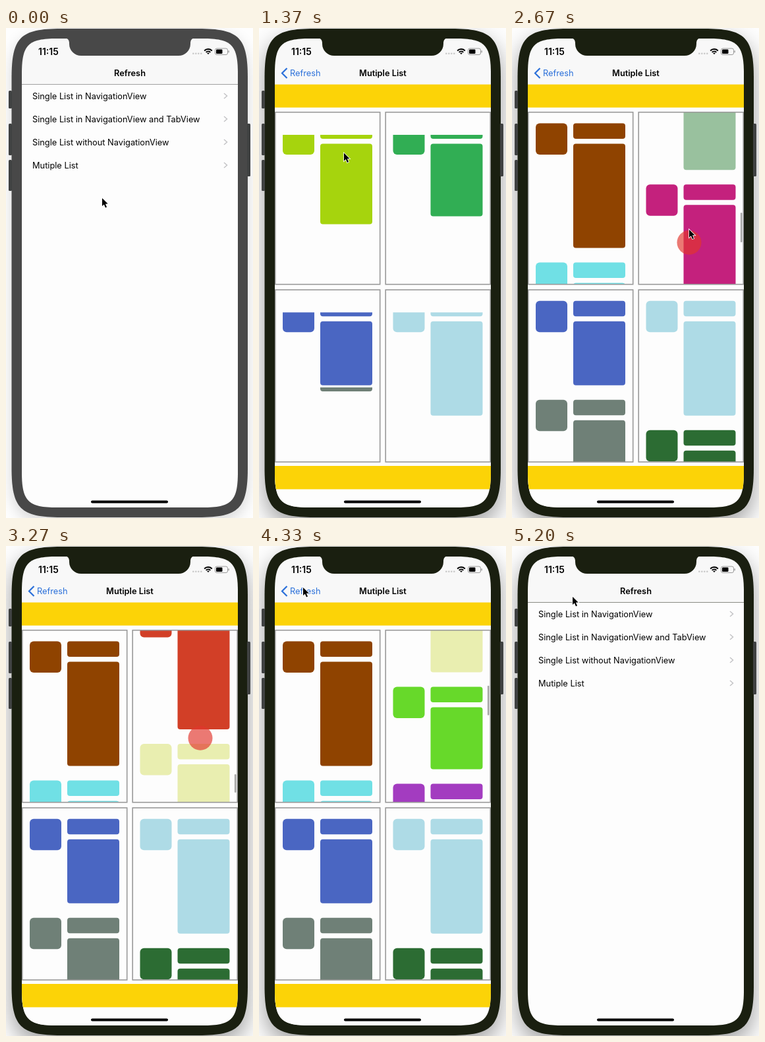
An HTML page with a canvas that plays this animation: 375x743 px, repeating every 5700 ms.

```html
<!DOCTYPE html>
<html lang="en">
<head>
<meta charset="utf-8">
<title>Refresh</title>
<style>
html, body { margin: 0; width: 100%; height: 100%; overflow: hidden; background: #fefefe; }
canvas { display: block; width: 375px; height: 743px; }
</style>
</head>
<body>
<canvas id="stage"></canvas>
<script>
const LOOP = 5700, W = 375, H = 743;
const canvas = document.getElementById('stage');
const c = canvas.getContext('2d');
const dpr = window.devicePixelRatio || 1;
canvas.width = W * dpr;
canvas.height = H * dpr;

const FAMILY = 'Inter, "Liberation Sans", sans-serif';
const FONT = `12.8px ${FAMILY}`, BOLD = `600 ${FONT}`, CLOCK = `600 14px ${FAMILY}`;
const MENU = ['Single List in NavigationView', 'Single List in NavigationView and TabView',
  'Single List without NavigationView', 'Mutiple List'];

// Rows are [colour, height of the large block].
const LIME = [['#a6d40d', 122], ['#1a1f10', 120]];
const BROWN = [['#8f4300', 158], ['#70e0e5', 120]];
const GREEN = [['#31ae54', 110], ['#4cf85f', 130], ['#d9a441', 120], ['#99c19e', 140],
  ['#c4217d', 150], ['#5687a8', 117], ['#d23f27', 156], ['#e9eeb0', 130],
  ['#67d92a', 94], ['#a33cc0', 120], ['#3f8f96', 130]];
const BLUE = [['#4a66c2', 97], ['#6f8077', 130]];
const SKY = [['#aedbe6', 143], ['#2c6c33', 130]];

const OPEN = 600, SETTLE = 1420, PULL = 1480, RELEASE = 1760, RELOAD = 2350, MORE = 3850, CLOSE = 4500;
const DRAG = 130, LAG = 30;

// Flings are [start, distance scrolled, finger x, finger y].
const FLINGS = [[2330, 560, 290, 335], [2620, 182, 269, 339], [2900, 353, 285, 330],
  [3220, 130, 295, 305], [4000, 184, 288, 330]];
const TOUCHES = [[450, 540], [PULL, RELEASE], ...FLINGS.map(([t]) => [t, t + DRAG]), [4410, 4480]];
const PATH = [[120, 146, 258], [400, 129, 209], [800, 129, 209], [1200, 129, 189], [PULL, 129, 190],
  [RELEASE, 125, 285], [2200, 292, 320],
  ...FLINGS.flatMap(([t, , x, y]) => [[t, x, y], [t + DRAG, x, y - 85]]),
  [4300, 67, 63], [CLOSE, 67, 63], [5150, 92, 77]];

const clamp = x => Math.max(0, Math.min(1, x));
const progress = (t, start, length) => clamp((t - start) / length);
const easeOut = x => 1 - (1 - x) ** 3;
const within = (t, a, b) => t >= a && t < b;

function cursorAt(t) {
  const i = PATH.findIndex(k => k[0] > t);
  const b = PATH.at(i), a = i > 0 ? PATH[i - 1] : b;
  const p = progress(t, a[0], b[0] - a[0] || 1);
  return [a[1] + (b[1] - a[1]) * p, a[2] + (b[2] - a[2]) * p];
}

function scrollAt(t) {
  return FLINGS.reduce((sum, [start, d]) => sum + d * easeOut(progress(t, start, 400)), 0);
}

function pullAt(t) {
  return 68 * progress(t, PULL, RELEASE - PULL) - 33 * easeOut(progress(t, RELEASE, 120))
    - 35 * easeOut(progress(t, RELOAD, 130));
}

function rect(x, y, w, h, color) {
  c.fillStyle = color;
  c.fillRect(x, y, w, h);
}

function round(x, y, w, h, r, color) {
  c.beginPath();
  c.roundRect(x, y, w, h, r);
  c.fillStyle = color;
  c.fill();
}

// Rounded rectangle whose curvature fades into the straight sides.
function smoothRect(x, y, w, h, r) {
  const e = 1.53 * r, k = .27 * r, R = x + w, B = y + h;
  c.beginPath();
  c.moveTo(x + e, y);
  c.lineTo(R - e, y);
  c.bezierCurveTo(R - k, y, R, y + k, R, y + e);
  c.lineTo(R, B - e);
  c.bezierCurveTo(R, B - k, R - k, B, R - e, B);
  c.lineTo(x + e, B);
  c.bezierCurveTo(x + k, B, x, B - k, x, B - e);
  c.lineTo(x, y + e);
  c.bezierCurveTo(x, y + k, x + k, y, x + e, y);
  c.closePath();
}

function line(points, color, width) {
  c.beginPath();
  points.forEach(([x, y]) => c.lineTo(x, y));
  c.strokeStyle = color;
  c.lineWidth = width;
  c.stroke();
}

function text(s, x, y, color = '#000', font = FONT, align = 'left') {
  c.font = font;
  c.textAlign = align;
  c.fillStyle = color;
  c.fillText(s, x, y);
}

function clipped(x, y, w, h, draw) {
  c.save();
  c.beginPath();
  c.rect(x, y, w, h);
  c.clip();
  draw();
  c.restore();
}

function shifted(dx, draw) {
  c.save();
  c.translate(dx, 0);
  draw();
  c.restore();
}

function device(active, color) {
  const buttons = '#3f4141';
  rect(0, 0, W, H, '#fefefe');
  c.save();
  c.shadowColor = active ? 'rgba(0,0,0,.38)' : 'rgba(0,0,0,.16)';
  c.shadowBlur = (active ? 34 : 22) * dpr;
  c.shadowOffsetY = (active ? 14 : 8) * dpr;
  smoothRect(8.5, 1, 358.5, 741, 49);
  c.fillStyle = color;
  c.fill();
  c.restore();
  [[95, 27], [145, 48], [200, 47]].forEach(([y, h]) => round(4, y, 5, h, 1.5, buttons));
  round(366, 145, 5, 80, 1.5, buttons);
}

function statusBar(color) {
  c.beginPath();
  c.moveTo(89, 15);
  c.arcTo(96, 15, 96, 22, 7);
  c.arcTo(96, 42, 114, 42, 18);
  c.arcTo(280, 42, 280, 24, 18);
  c.arcTo(280, 15, 287, 15, 7);
  c.fillStyle = color;
  c.fill();

  text('11:15', 49, 40.5, '#000', CLOCK);
  for (let i = 0; i < 4; i++) round(283 + i * 4, 37.5, 2.6, 2.6, 1.3, '#c8c8c8');
  [1.5, 4.5, 8].forEach(r => {
    c.beginPath();
    c.arc(307, 40, r, -Math.PI * .76, -Math.PI * .24);
    c.strokeStyle = '#000';
    c.lineWidth = 2;
    c.stroke();
  });
  c.beginPath();
  c.roundRect(317.5, 31, 19, 9.5, 2.5);
  c.strokeStyle = '#999';
  c.lineWidth = 1;
  c.stroke();
  round(319, 32.5, 9.5, 6.5, 1.2, '#000');
  round(337.5, 34, 1.3, 3.5, .7, '#999');
}

function menu(t) {
  rect(24, 86, 328, 642, '#fdfdfd');
  if (within(t, 470, 1040)) rect(24, 191, 328, 35, '#d9d9dc');
  MENU.forEach((label, i) => {
    const y = 103 + i * 35;
    text(label, 40, y + 5);
    line([[331, y - 4], [335.5, y], [331, y + 4]], '#c4c4c6', 1.5);
  });
}

function spinner(x, y, t) {
  const step = Math.floor(t / 80);
  for (let i = 0; i < 12; i++) {
    const a = i * Math.PI / 6, shade = (i + 120 - step % 12) % 12 / 11;
    line([3.8, 8].map(r => [x + Math.cos(a) * r, y + Math.sin(a) * r]),
      `rgba(90,90,90,${.18 + .5 * shade})`, 1.4);
  }
}

function rows(x, y, items) {
  items.forEach(([color, h]) => {
    round(x + 12, y, 48, 47.5, 6, color);
    round(x + 69, y, 79, 23.5, 4, color);
    round(x + 69, y + 31, 79, h, 4, color);
    y += h + 53;
  });
}

function list(col, row, items, shift, settled) {
  const x = 24 + col * 167.5, y = 127 + row * 269.3, top = y + 17.5;
  clipped(x, y, 160, 262, () => {
    if (settled) rows(x, top + shift, items);
    else clipped(x, y + 35, 160, 227, () => rows(x, top, items.slice(0, 1)));
  });
  c.strokeStyle = '#999';
  c.lineWidth = 1.6;
  c.strokeRect(x + .7, y + .7, 159, 261);
}

function scrollBar(t, scroll) {
  // loading more rows makes the list longer, so the bar moves back up
  const top = 130 + (t < MORE ? 216 * (scroll / 1138) ** .6 : scroll * .058);
  round(347, top, 2.4, Math.min(45, 374 - top), 1.2, 'rgba(0,0,0,.36)');
}

function lists(t) {
  const settled = t >= SETTLE, scroll = scrollAt(t);
  rect(24, 85, 328, 643, '#fdfdfd');
  [85.2, 664].forEach(y => rect(24, y, 328, 35.4, '#fcd307'));
  list(0, 0, t < RELOAD ? LIME : BROWN, pullAt(t), settled);
  list(1, 0, GREEN, -scroll, settled);
  list(0, 1, BLUE, 0, settled);
  list(1, 1, SKY, 0, settled);
  if (!settled) round(93, 545, 79, 6, [0, 0, 4, 4], '#6f8077');
  if (within(t, PULL + 100, RELOAD)) spinner(104, 154, t);
  if (scroll > 0 && t < CLOSE) scrollBar(t, scroll);
}

function navBar(p) {
  rect(24, 16, 328, 69.5, '#f8f8f8');
  c.globalAlpha = 1 - p;
  text('Refresh', 188 - 120 * p, 73, '#000', BOLD, 'center');
  c.globalAlpha = p;
  text('Mutiple List', 188 + 140 * (1 - p), 73, '#000', BOLD, 'center');
  line([[42.5, 61], [35, 68.5], [42.5, 76]], '#2b70da', 2.2);
  text('Refresh', 47 + 110 * (1 - p), 73, '#2b70da');
  c.globalAlpha = 1;
}

function screen(t) {
  const p = easeOut(progress(t, OPEN, 420)) - easeOut(progress(t, CLOSE, 400));
  c.save();
  smoothRect(24, 16, 328, 711, 35);
  c.clip();
  shifted(-98 * p, () => menu(t));
  rect(24, 86, 328, 642, `rgba(0,0,0,${.1 * p})`);
  if (p > 0) shifted(328 * (1 - p), () => lists(t));
  navBar(p);
  round(129, 716.5, 117, 4, 2, '#000');
  c.restore();
}

function pointer(t) {
  if (TOUCHES.some(([a, b]) => within(t, a, b))) {
    const [x, y] = cursorAt(t - LAG);
    c.beginPath();
    c.arc(x, y, 18.5, 0, Math.PI * 2);
    c.fillStyle = 'rgba(226,54,44,.66)';
    c.fill();
  }
  if (within(t, 3180, 3420)) return;
  const [x, y] = cursorAt(t);
  c.save();
  c.translate(x, y);
  c.beginPath();
  [[0, 0], [0, 12], [2.8, 9.4], [5, 14.4], [7, 13.5], [4.9, 8.7], [8.6, 8.6]]
    .forEach(([px, py]) => c.lineTo(px, py));
  c.closePath();
  c.strokeStyle = '#fff';
  c.lineWidth = 1.6;
  c.stroke();
  c.fillStyle = '#000';
  c.fill();
  c.restore();
}

function frame(now) {
  const t = now % LOOP, active = t >= 450;
  const bezel = active ? '#1a1f10' : '#484848';
  c.setTransform(dpr, 0, 0, dpr, 0, 0);
  device(active, bezel);
  screen(t);
  statusBar(bezel);
  pointer(t);
}

const start = performance.now();
function tick() {
  frame(performance.now() - start);
  requestAnimationFrame(tick);
}
tick();
</script>
</body>
</html>
```
